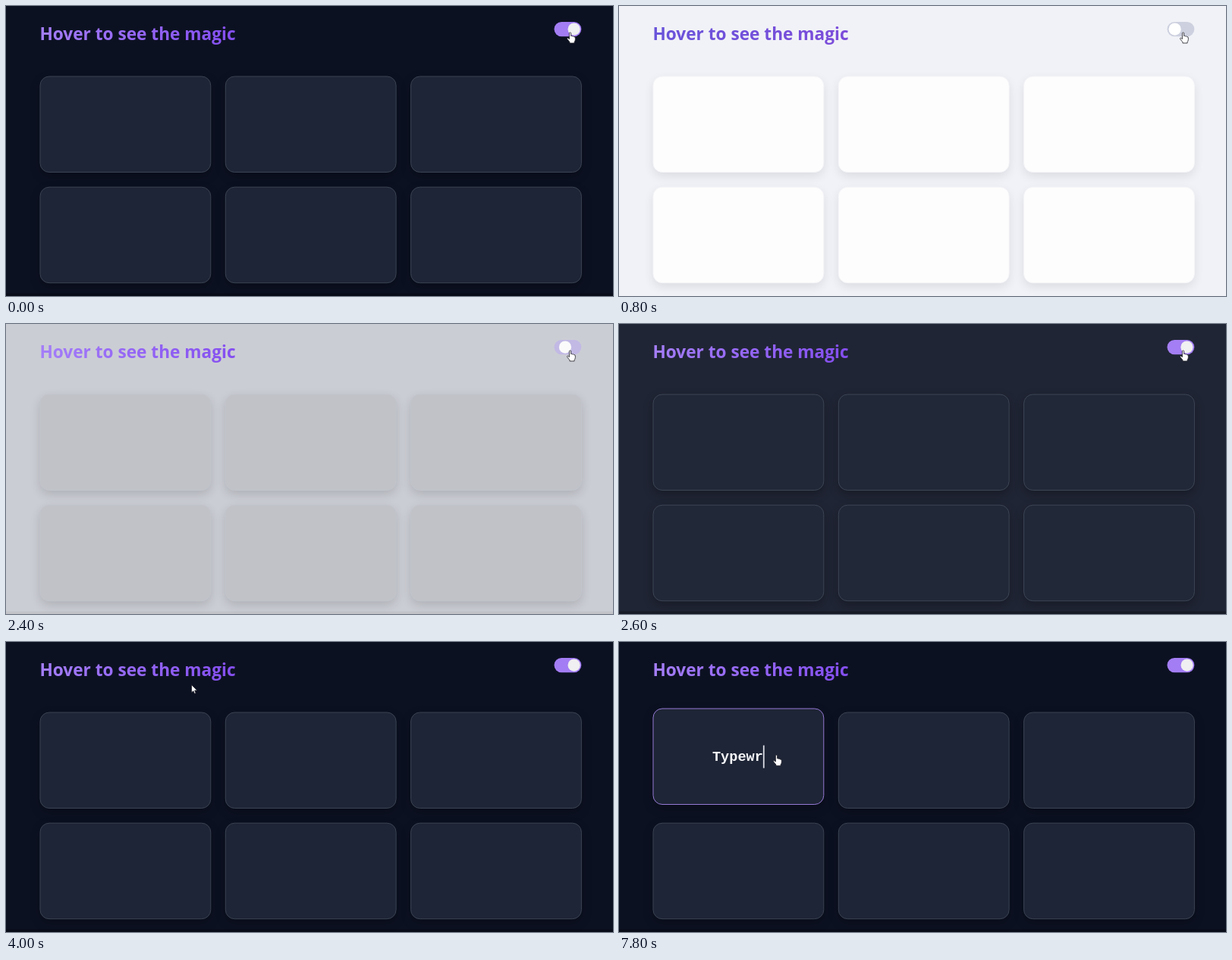
Recreate the animation shown at these times as an HTML page. Size 800 px wide and 383 px high, loop 8 s.

```html
<!DOCTYPE html>
<html lang="en">
<head>
<meta charset="utf-8">
<title>Hover to see the magic</title>
<style>
  html, body { margin: 0; width: 100%; height: 100%; overflow: hidden; }
  svg { display: block; width: 100vw; height: 100vh; }
  .title { font: 700 22.65px "Open Sans", "Noto Sans", sans-serif; }
  .typed { font: 700 18.6px "Liberation Mono", "Courier New", monospace; fill: #f6f7fa; }
  .pointer { fill: #fff; stroke: #1a1a22; stroke-width: .8; stroke-linejoin: round; }
</style>
</head>
<body>
<svg viewBox="0 0 800 383" preserveAspectRatio="none">
  <defs>
    <linearGradient id="ink" gradientUnits="userSpaceOnUse" x1="45" y1="0" x2="303" y2="0">
      <stop/><stop offset="1"/>
    </linearGradient>
    <filter id="soft" x="-20%" y="-30%" width="140%" height="160%">
      <feGaussianBlur stdDeviation="7"/>
    </filter>
  </defs>
  <rect id="page" width="800" height="383"/>
  <rect id="edge" y="379.5" width="800" height="4"/>
  <text class="title" x="44.4" y="45" fill="url(#ink)">Hover to see the magic</text>
  <rect id="track" x="722.5" y="21" width="35.8" height="19.2" rx="9.6"/>
  <circle id="knob" cy="30.6" r="8.1"/>
  <g id="cards"></g>
  <g id="typing">
    <text class="typed" y="157"></text>
    <rect y="136.5" width="1.8" height="30" fill="#d9dce3"/>
  </g>
  <path id="arrow" class="pointer" d="M0 0V10.3L2.4 8.2 4 11.8 5.7 11.1 4.2 7.5H7.4Z"/>
  <path id="hand" class="pointer" d="M-1.1 .6Q0-.7 1.1 .6V4.6Q2.2 3.9 3 5 4.2 4.4 4.9 5.6 6.6 5.2 6.8 7V9.6Q6.6 11.4 5.6 12.4V14H-.6V12.6L-3.9 8.6Q-4.2 7.2-3 7.2L-1.1 8.6Z"/>
</svg>
<script>
const LOOP = 8000, STEP = 200;
const LIGHT_AT = 430, DARK_AT = 2343, HOVER_AT = 6300, CHAR_MS = 240;
const WORD = "Typewriter", CHAR_W = 11.16, CENTER_X = 157.4;
const THEME = {
  page: [[12, 17, 34], [242, 243, 248]],
  card: [[30, 37, 54], [253, 253, 253]],
  border: [[59, 68, 83], [245, 245, 249]],
  track: [[163, 125, 244], [205, 208, 223]],
  knob: [[240, 239, 241], [255, 255, 255]]
};
const ACCENT = [150, 122, 214];
const INK = { dark: ["#a47ef8", "#844ef0"], light: ["#6954da", "#7c4cda"] };
// time, x, y of the pointer hotspot
const POINTER = [
  [0, 743.5, 35], [3600, 743.5, 35], [3800, 540, 50], [4000, 244.5, 56.5],
  [4400, 155, 62], [4800, 210, 63], [5400, 205, 66], [6000, 206.5, 84.5],
  [6300, 207, 95], [7000, 207.5, 149], [8000, 207.5, 149.5]
];

const $ = id => document.getElementById(id);
const clamp = v => Math.min(1, Math.max(0, v));
const lerp = (a, b, k) => a + (b - a) * k;
const mix = (a, b, k) => a.map((v, i) => lerp(v, b[i], k));
const rgb = c => `rgb(${c.map(Math.round)})`;

// the CSS "ease" curve, cubic-bezier(.25, .1, .25, 1)
function ease(x) {
  const bez = (p, q, s) => 3 * p * s * (1 - s) ** 2 + 3 * q * s * s * (1 - s) + s ** 3;
  let lo = 0, hi = 1;
  for (let i = 0; i < 20; i++) {
    const mid = (lo + hi) / 2;
    if (bez(.25, .25, mid) < x) lo = mid; else hi = mid;
  }
  return bez(.1, 1, lo);
}
const rise = (t, start, span) => ease(clamp((t - start) / span));
const lightness = (t, span) => rise(t, LIGHT_AT, span) - rise(t, DARK_AT, span);
const themed = (name, k) => mix(...THEME[name], k);

function pointerAt(t) {
  const i = POINTER.findIndex(p => p[0] > t);
  const [a, b] = [POINTER[i - 1], POINTER[i]];
  return mix(a, b, (t - a[0]) / (b[0] - a[0])).slice(1);
}

function rect(parent, attrs) {
  const el = document.createElementNS("http://www.w3.org/2000/svg", "rect");
  for (const key in attrs) el.setAttribute(key, attrs[key]);
  return parent.appendChild(el);
}

const cards = Array.from({ length: 6 }, (_, i) => {
  const box = {
    x: 45 + (i % 3) * 244.3, y: 93 + Math.floor(i / 3) * 146.2,
    width: 224.8, height: 126.5, rx: 12
  };
  const shadow = rect($("cards"), { ...box, y: box.y + 5, filter: "url(#soft)" });
  return { shadow, face: rect($("cards"), box) };
});
const stops = document.querySelectorAll("#ink stop");
const [typed, caret] = $("typing").children;

function draw(t) {
  const slow = lightness(t, 400), quick = lightness(t, 300);
  const isLight = t >= LIGHT_AT && t < DARK_AT;
  const hover = rise(t, HOVER_AT, 300);

  $("page").style.fill = rgb(themed("page", slow));
  $("edge").style.opacity = .3 * (1 - slow);
  $("track").style.fill = rgb(themed("track", quick));
  $("knob").style.fill = rgb(themed("knob", quick));
  $("knob").setAttribute("cx", lerp(748.6, 732.6, quick));
  stops.forEach((s, i) => s.style.stopColor = INK[isLight ? "light" : "dark"][i]);

  cards.forEach(({ shadow, face }, i) => {
    const k = i ? 0 : hover;
    shadow.style.opacity = lerp(.28, .09, quick);
    face.style.fill = rgb(themed("card", quick));
    face.style.stroke = rgb(mix(themed("border", quick), ACCENT, k));
    for (const el of [shadow, face]) el.setAttribute("transform", `translate(0 ${-5 * k})`);
  });

  const hovering = t >= HOVER_AT;
  const count = Math.max(0, Math.floor((t - HOVER_AT) / CHAR_MS));
  const half = count * CHAR_W / 2;
  $("typing").style.display = hovering ? "" : "none";
  typed.textContent = WORD.slice(0, count);
  typed.setAttribute("x", CENTER_X - half - 1);
  caret.setAttribute("x", CENTER_X + half - 1);

  const onLink = t <= 3600 || hovering;
  const [x, y] = pointerAt(t);
  for (const [id, shown] of [["hand", onLink], ["arrow", !onLink]]) {
    $(id).style.display = shown ? "" : "none";
    $(id).setAttribute("transform", `translate(${x} ${y})`);
  }
}

const start = performance.now();
function tick() {
  const t = (performance.now() - start) % LOOP;
  draw(Math.floor(t / STEP) * STEP);
  requestAnimationFrame(tick);
}
tick();
</script>
</body>
</html>
```
